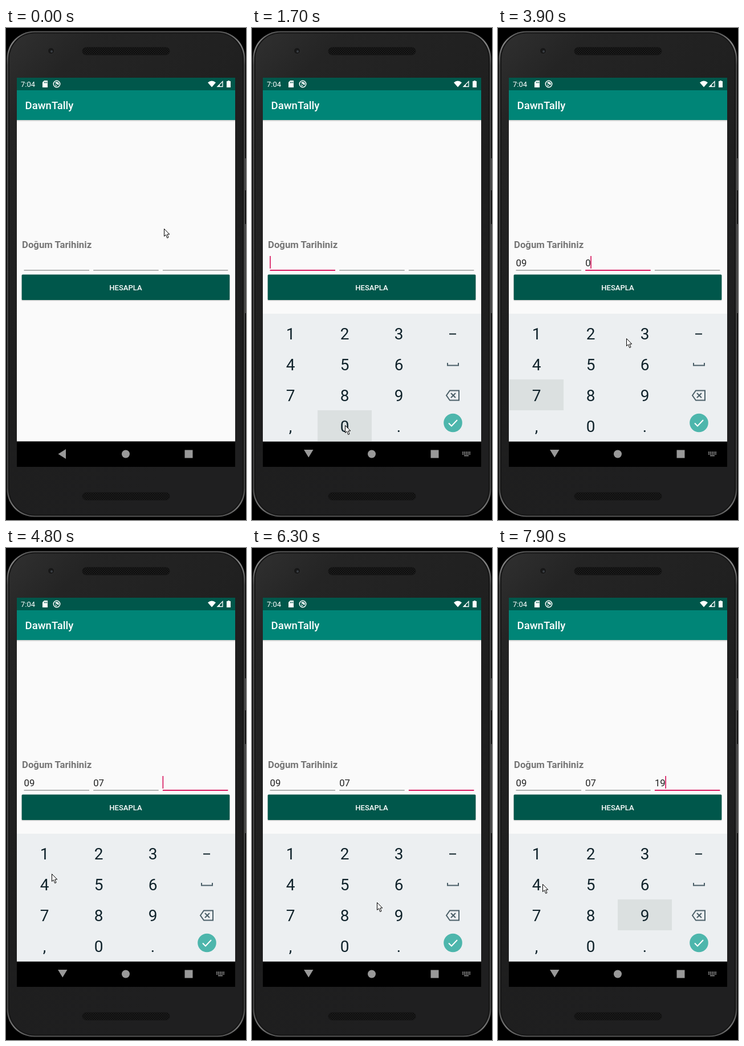
These frames come from a looping animation (421 by 861 pixels, 8000 ms). An HTML page:

```html
<!DOCTYPE html>
<html lang="tr">
<head>
<meta charset="utf-8">
<title>DawnTally</title>
<style>
  html, body { margin: 0; width: 100%; height: 100%; overflow: hidden; background: #000; }
  svg { display: block; width: 421px; height: 861px; font-family: Roboto, sans-serif; }
  .key { font-size: 28px; fill: #10232b; text-anchor: middle; }
  .value { font-size: 16.76px; fill: #212121; }
  .icon { fill: none; stroke: #4b5f68; stroke-width: 2; }
  .rule { fill: #808482; }
  .rule.active { fill: #d81b60; }
</style>
</head>
<body>
<svg viewBox="0 0 421 861">
  <defs>
    <linearGradient id="rim" x2="0" y2="1">
      <stop offset="0" stop-color="#555"/>
      <stop offset=".025" stop-color="#858585"/>
      <stop offset=".07" stop-color="#484848"/>
      <stop offset=".94" stop-color="#444"/>
      <stop offset=".98" stop-color="#777"/>
      <stop offset="1" stop-color="#555"/>
    </linearGradient>
    <linearGradient id="body" x2=".5" y2="1">
      <stop offset="0" stop-color="#303030"/>
      <stop offset=".15" stop-color="#242424"/>
      <stop offset=".6" stop-color="#1e1e1e"/>
      <stop offset="1" stop-color="#1f1f20"/>
    </linearGradient>
    <pattern id="mesh" width="4" height="4" patternUnits="userSpaceOnUse">
      <rect width="4" height="4" fill="#1c1c1c"/>
      <circle cx="1" cy="1" r=".9" fill="#050505"/>
      <circle cx="3" cy="3" r=".9" fill="#050505"/>
    </pattern>
    <linearGradient id="shade" x2="0" y2="1">
      <stop offset="0" stop-opacity=".2"/>
      <stop offset="1" stop-opacity="0"/>
    </linearGradient>
    <clipPath id="view"><rect x="19" y="161" width="383" height="562.4"/></clipPath>
  </defs>

  <!-- Phone -->
  <rect width="421" height="861"/>
  <path d="M420 228v56M420 343v156" stroke="#444" stroke-width="2"/>
  <rect x="1.5" y="5.5" width="418" height="850" rx="48" fill="url(#rim)"/>
  <rect x="4" y="7.5" width="413" height="846" rx="46" fill="#151515"/>
  <rect x="6" y="9.5" width="409" height="842" rx="44" fill="url(#body)"/>
  <circle cx="79" cy="40" r="7.5" fill="#292929"/>
  <circle cx="79" cy="40" r="5" fill="#181818"/>
  <circle cx="80" cy="41" r="2" fill="#3b4046"/>
  <g fill="url(#mesh)" stroke="#151515">
    <rect x="134" y="34" width="153" height="13" rx="6.5"/>
    <rect x="134" y="813" width="153" height="13" rx="6.5"/>
  </g>

  <!-- Screen -->
  <rect x="19" y="87" width="383" height="681"/>
  <rect x="19" y="161" width="383" height="562.4" fill="#fafafa"/>
  <rect x="19" y="161" width="383" height="3" fill="url(#shade)"/>
  <rect x="19" y="109" width="383" height="52" fill="#008577"/>
  <rect x="19" y="87" width="383" height="22" fill="#00574b"/>
  <g fill="#fff">
    <text x="26" y="103" font-size="13">7:04</text>
    <path d="M67 92h6v12h-9v-9z"/>
    <path d="M67.5 94v2.5m2-2.5v2.5m2-2.5v2.5" stroke="#00574b"/>
    <circle cx="89" cy="98" r="5.7" fill="none" stroke="#fff" stroke-width="1.5"/>
    <path d="M86 96a3.6 3.6 0 0 1 6 4zM86 98l4 3.5h-3z"/>
    <path d="M354 95.5q7-6 14 0l-7 8z"/>
    <path d="M380 93.5v9h-9z" fill="none" stroke="#fff" stroke-width="1.3"/>
    <path d="M375 98.5v4.5h-5z"/>
    <path d="M389 92h3v1h2v11h-7V93h2z"/>
    <text x="33.5" y="142" font-size="18.6" font-weight="500">DawnTally</text>
  </g>
  <text x="28" y="385" font-size="16.76" font-weight="700" fill="#757575">Doğum Tarihiniz</text>
  <rect x="27" y="431.5" width="366" height="46" rx="2" opacity=".16"/>
  <rect x="27.7" y="431.5" width="364.6" height="44.5" rx="1.5" fill="#00574b"/>
  <text x="210" y="459" font-size="13.05" font-weight="500" fill="#fff" text-anchor="middle">HESAPLA</text>
  <g id="fields"></g>

  <g clip-path="url(#view)">
    <g id="keyboard">
      <rect x="19" y="500" width="383" height="224" fill="#eceff1"/>
      <rect id="pressed" x="-47.5" y="-28" width="95" height="54" fill="#dbe0e0"/>
      <g id="keys"></g>
      <path d="M346 535.5h12" stroke="#10232b" stroke-width="2.2"/>
      <path class="icon" d="M343 586v4.5h19V586"/>
      <path class="icon" d="M341 643l6-8.5h16v17h-16zM349 639l8 8m0-8l-8 8"/>
      <circle cx="352.5" cy="691" r="16.3" fill="#4db6ac"/>
      <path d="M345 691.5l5 5 10-10.5" fill="none" stroke="#fff" stroke-width="2"/>
    </g>
  </g>

  <!-- Navigation -->
  <g fill="#999">
    <path id="back" d="M91.5 745.5l13.5-8.500v17z"/>
    <g id="down">
      <path d="M91 738h16.500l-8.250 13.500z"/>
      <path d="M369 742.500h14M369 745.500h14" stroke="#999" stroke-width="2" stroke-dasharray="2 1"/>
      <path d="M372 748.500h8" stroke="#999" stroke-width="1.500"/>
    </g>
    <circle cx="210" cy="745.500" r="7"/>
    <rect x="313.500" y="738.500" width="14" height="14"/>
  </g>
  <path id="pointer" d="M.5.5V13.500L3.500 10.800 5.700 16.500 8 15.500 5.800 10H9.800Z" fill="#fff" stroke="#000"/>
</svg>

<script>
const LOOP = 8000, STEP = 100, BLINK = 500, LAG = 200, DIGIT = 9.4;
const $ = id => document.getElementById(id);
const show = (el, on) => el.setAttribute('visibility', on ? 'visible' : 'hidden');
const place = (el, [x, y]) => el.setAttribute('transform', `translate(${x} ${y})`);
const clamp = k => Math.min(1, Math.max(0, k));
const ease = k => k * k * (3 - 2 * k);

function add(parent, tag, attrs, text = '') {
  const el = document.createElementNS('http://www.w3.org/2000/svg', tag);
  for (const name in attrs) el.setAttribute(name, attrs[name]);
  el.textContent = text;
  return parent.appendChild(el);
}

const keys = {};
['123', '456', '789', ',0.'].forEach((row, r) => [...row].forEach((label, c) => {
  const [x, y] = keys[label] = [67.5 + 95 * c, 535 + 54 * r];
  add($('keys'), 'text', { class: 'key', x, y: y + 10 }, label);
}));

// Each digit appears LAG after its key goes down.
const makeField = (i, focus, blur, ...taps) => {
  const x = 31.5 + 121.7 * i, parent = $('fields');
  return {
    x, focus, blur, taps,
    rule: add(parent, 'rect', { x, width: 114.5 }),
    value: add(parent, 'text', { class: 'value', x, y: 416.7 }),
    caret: add(parent, 'rect', { y: 399, width: 1.7, height: 22, fill: '#d81b60' })
  };
};
const tap = (key, down, up = down + LAG) => ({ key, down, up });
const fields = [
  makeField(0, 400, 2700, tap('0', 1700), tap('9', 2000)),
  makeField(1, 2700, 4800, tap('0', 3300), tap('7', 3800)),
  makeField(2, 4800, LOOP, tap('1', 6900), tap('9', 7300, LOOP))
];
const allTaps = fields.flatMap(f => f.taps);

const onKey = label => [keys[label][0], keys[label][1] - 2];
const inField = i => [fields[i].x + 40, 412];
const home = [277, 351], wanderFrom = [80, 570], wanderStart = 4900, wanderTime = 1867;

const moves = [
  { from: 100, to: 500, goal: inField(0) },
  { from: 1000, to: 1400, goal: onKey('0') },
  { from: 1800, to: 2050, goal: onKey('9') },
  { from: 2250, to: 2400, goal: [190, 471] },
  { from: 2600, to: 2700, goal: inField(1) },
  { from: 2900, to: 3200, goal: onKey('0') },
  { from: 3500, to: 3700, goal: onKey('7') },
  { from: 3700, to: 3900, goal: [225, 543] },
  { from: 3900, to: 4100, goal: inField(2) },
  { from: 4400, to: 4800, goal: wanderFrom },
  { from: 6800, to: 7000, goal: onKey('1') },
  { from: 7100, to: 7400, goal: onKey('9') },
  { from: 7600, to: 7900, goal: [78, 588] }
];

function pointerAt(t) {
  const w = (t - wanderStart) / wanderTime;
  if (w > 0 && w < 1) {
    const swing = 1 - Math.cos(2 * Math.PI * w);
    return [wanderFrom[0] + 139 * swing, wanderFrom[1] + 50 * swing ** 2].map(Math.round);
  }
  return moves.reduce((pos, { from, to, goal }) => {
    const k = ease(clamp((t - from) / (to - from)));
    return pos.map((p, n) => p + (goal[n] - p) * k);
  }, home).map(Math.round);
}

function drawField(f, t) {
  const active = t >= f.focus && t < f.blur;
  const typed = f.taps.filter(({ down }) => t >= down + LAG);
  const since = typed.length ? typed[typed.length - 1].down + LAG : f.focus;
  f.rule.setAttribute('class', active ? 'rule active' : 'rule');
  f.rule.setAttribute('y', active ? 423 : 423.4);
  f.rule.setAttribute('height', active ? 2 : 1.2);
  f.value.textContent = typed.map(({ key }) => key).join('');
  f.caret.setAttribute('x', f.x + DIGIT * typed.length - .4);
  show(f.caret, active && Math.floor((t - since) / BLINK) % 2 === 0);
}

function draw(t) {
  place($('pointer'), pointerAt(t));

  const rise = clamp((t - 600) / 300);
  place($('keyboard'), [0, 223 * (1 - rise) ** 2]);
  show($('keyboard'), rise > 0);
  show($('down'), rise > 0);
  show($('back'), rise === 0);

  const press = allTaps.find(({ down, up }) => t >= down && t < up);
  show($('pressed'), press);
  if (press) place($('pressed'), keys[press.key]);

  fields.forEach(f => drawField(f, t));
}

const start = performance.now();
function tick() {
  const t = (performance.now() - start) % LOOP;
  draw(Math.floor(t / STEP) * STEP);
  requestAnimationFrame(tick);
}
tick();
</script>
</body>
</html>
```
